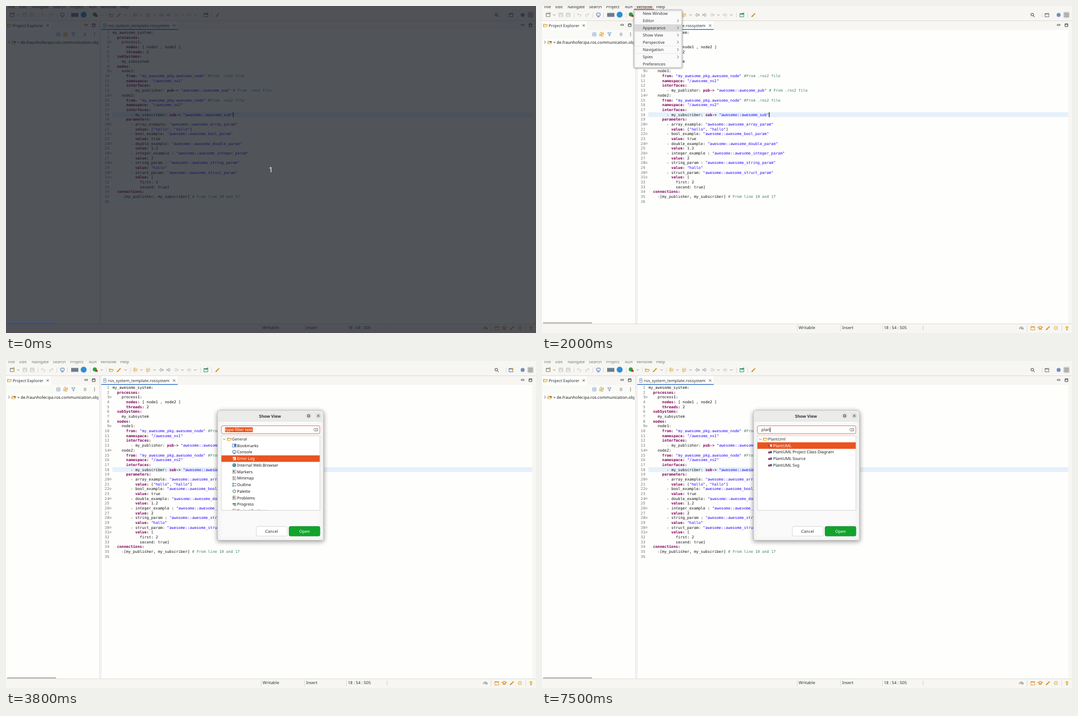
Write an HTML page with a canvas that moves like this. It is 952 px wide and 588 px high and loops after 8 s.

```html
<!DOCTYPE html>
<html lang="en">
<head>
<meta charset="utf-8">
<title>Show View</title>
<style>
html, body { margin: 0; width: 100%; height: 100%; overflow: hidden; background: #fff; }
canvas { display: block; width: 952px; height: 588px; }
</style>
</head>
<body>
<canvas id="stage" width="952" height="588"></canvas>
<script>
const ctx = document.getElementById('stage').getContext('2d');
const LOOP = 8000;
const UI = '"Noto Sans", "Open Sans", sans-serif';
const MONO = '"DejaVu Sans Mono", monospace';
const CODE_SIZE = 6.785, COLUMN = 4.085, CODE_X = 191.3, LINE = 8.68;
const PAPER = '#fefffd', CHROME = '#f7f6f2', ORANGE = '#e95420', INK = '#2e3236',
  GRAY = '#8b8d8e', PALE = '#c3c3c0', BLUE = '#3c74b8', GOLD = '#d9a02c', RULE = '#d3d2ce';

const code = `my_awesome_system:
  processes:
    process1:
      nodes: [ node1 , node2 ]
      threads: 2
  subSystems:
    my_subsystem
  nodes:
    node1:
      from: "my_awesome_pkg.awesome_node" #From .ros2 file
      namespace: "/awesome_ns1"
      interfaces:
        - my_publisher: pub-> "awesome::awesome_pub" # From .ros2 file
    node2:
      from: "my_awesome_pkg.awesome_node" #From .ros2 file
      namespace: "/awesome_ns2"
      interfaces:
        - my_subscriber: sub-> "awesome::awesome_sub"
      parameters:
        - array_example: "awesome::awesome_array_param"
          value: ["hello", "hallo"]
        - bool_example: "awesome::awesome_bool_param"
          value: true
        - double_example: "awesome::awesome_double_param"
          value: 1.2
        - integer_example : "awesome::awesome_integer_param"
          value: 2
        - string_param : "awesome::awesome_string_param"
          value: "hallo"
        - struct_param: "awesome::awesome_struct_param"
          value: [
            first: 2
            second: true]
  connections:
    -[my_publisher, my_subscriber] # From line 10 and 17
`.split('\n');
const folds = [3, 9, 14, 20, 22, 24, 26, 28, 30, 31];
const token = /(#.*)|("[^"]*")|(\b(?:processes|nodes|threads|subSystems|from|namespace|interfaces|parameters|value|connections):|(?:pub|sub)->)|[^\s"#]+/g;

// Drawing helpers
function rect(x, y, w, h, color) {
  ctx.fillStyle = color;
  ctx.fillRect(x, y, w, h);
}
function panel(x, y, w, h, r, fill, border) {
  ctx.beginPath();
  ctx.roundRect(x, y, w, h, r);
  ctx.fillStyle = fill;
  ctx.fill();
  if (!border) return;
  ctx.strokeStyle = border;
  ctx.lineWidth = 0.8;
  ctx.stroke();
}
function disc(x, y, r, color) {
  ctx.beginPath();
  ctx.arc(x, y, r, 0, 7);
  ctx.fillStyle = color;
  ctx.fill();
}
function stroke(x, y, d, color = INK, width = 0.9) {
  ctx.save();
  ctx.translate(x, y);
  ctx.strokeStyle = color;
  ctx.lineWidth = width;
  ctx.stroke(new Path2D(d));
  ctx.restore();
}
function text(s, x, y, { size = 7.4, color = INK, weight = 400, align = 'left', font = UI } = {}) {
  ctx.font = `${weight} ${size}px ${font}`;
  ctx.textAlign = align;
  ctx.fillStyle = color;
  ctx.fillText(s, x, y + size * 0.355);
}
function withShadow(blur, draw) {
  ctx.save();
  ctx.shadowColor = 'rgba(0,0,0,.4)';
  ctx.shadowBlur = blur;
  ctx.shadowOffsetY = blur / 5;
  draw();
  ctx.restore();
}

// Small icons, all centred on x, y
const down = (x, y, c = GRAY) => stroke(x, y, 'M-2.2-1L0 1.2L2.2-1', c);
const right = (x, y, c = '#555') => stroke(x, y, 'M-1.2-2.5L1.3 0L-1.2 2.5', c);
const cross = (x, y, c = '#555') => stroke(x, y, 'M-2-2L2 2M2-2L-2 2', c);
const frame = (x, y, c = INK, w = 7, h = 6) => {
  stroke(x, y, `M${-w / 2} ${-h / 2}h${w}v${h}h${-w}z`, c);
  stroke(x, y, `M${-w / 2} ${1 - h / 2}h${w}`, c);
};
const minMax = (a, b, y) => {
  stroke(a, y, 'M-2.5-1.5h5v2h-5z', INK, 0.7);
  frame(b, y, INK, 5, 5);
};
const arrow = (x, y, c, dir = 1) => stroke(x, y, `M${-3.5 * dir}-1h${4 * dir}v-2l${3 * dir} 3l${-3 * dir} 3v-2h${-4 * dir}z`, c);
const folder = (x, y) => {
  stroke(x, y, 'M-3.5 2.5v-5h2.5l1 1h3v1.5M-3.5 2.5l1.5-3.5h6l-1.7 3.5z', GOLD);
};
const pencil = (x, y, c = GOLD) => {
  stroke(x, y, 'M-3 3L2.8-2.8', c, 2.2);
  stroke(x, y, 'M-3.4 3.4l1.3-1.3', INK, 1);
};
const divider = x => rect(x, 12, 0.7, 9, RULE);

function drawToolbar(t) {
  rect(0, 0, 952, 588, CHROME);
  const color = t >= 3500 ? '#777a7c' : INK;
  [['File', 4], ['Edit', 24], ['Navigate', 46], ['Search', 84], ['Project', 115],
   ['Run', 149], ['Window', 170], ['Help', 205]].forEach(([s, x]) => text(s, x, 1.2, { color }));

  frame(11, 16, '#6b7c7c');
  stroke(14, 13, 'M-2 0h4M0-2v4', GOLD, 1.2);
  for (const x of [22, 172, 215, 243, 267, 317, 340]) down(x, 16);
  for (const x of [34, 47]) {
    panel(x - 3.5, 12.5, 7, 7, 1, '#dededb', PALE);
    rect(x - 1.5, 16.5, 3, 3, '#f2f2ef');
  }
  for (const x of [57, 91, 110, 151, 180, 223, 349, 369, 898]) divider(x);
  stroke(67, 16, 'M-2-3l-1.5 2l2 1.5M-3-1h3q3 0 3 2t-3 2', PALE);
  stroke(81, 16, 'M2-3l1.5 2l-2 1.5M3-1h-3q-3 0-3 2t3 2', PALE);
  panel(98, 12.8, 6.5, 5, 1, '#e4eefb', '#2f5fa8');
  rect(99.5, 19, 3.5, 1, '#2f5fa8');
  rect(117, 12.5, 13, 7, '#6d7d90');
  disc(139.5, 15.5, 5.3, '#2b8ed6');
  disc(159.5, 15.2, 3.6, '#2fa045');
  rect(160.5, 16, 4, 3.5, '#b5382d');
  folder(189, 16.5);
  pencil(203, 16);
  stroke(232, 16, 'M-2-3.5v4h-1.5l2.5 3l2.5-3H0v-4zM3-3v6', GOLD);
  stroke(255, 16, 'M-2 3.5v-4h-1.5l2.5-3l2.5 3H0v4zM3-3v6', GOLD);
  arrow(279, 16, '#8d9ba6', -1);
  arrow(292, 16, '#8d9ba6');
  arrow(306, 16, PALE, -1);
  arrow(329, 16, PALE);
  frame(359, 16.5, '#238b83');
  stroke(361, 14, 'M-2 2L2-2', '#2fa045', 1.5);
  pencil(380, 16);

  stroke(881, 15.5, 'M2 0A2.4 2.4 0 1 1-2.8 0A2.4 2.4 0 1 1 2 0M1.3 1.7L4 4.4', INK, 1);
  frame(907, 16.5, '#54708f');
  stroke(909, 13.5, 'M-2 0h4M0-2v4', GOLD);
  disc(928, 16, 3.6, '#6b8fc0');
  panel(937, 11, 10, 10, 1.5, '#dededb', '#b9b9b5');
  for (let i = 0; i < 9; i++) rect(938.8 + i % 3 * 2.6, 12.7 + (i / 3 | 0) * 2.6, 1.4, 1.4, '#444');
}

function drawExplorer() {
  rect(0, 26, 952, 0.7, RULE);
  rect(0, 27, 168, 544, PAPER);
  rect(0, 27, 168, 16, CHROME);
  rect(0, 27, 80, 16, PAPER);
  rect(0, 43, 168, 16, '#fafaf7');
  folder(6, 35);
  text('Project Explorer', 12, 35);
  cross(75, 35);
  minMax(144, 157.5, 34.5);
  panel(91, 48, 6, 6, 0.5, '#e8f0fa', '#7697bd');
  stroke(94, 51, 'M-1.8 0h3.6', BLUE);
  arrow(107, 49.5, GOLD, -1);
  arrow(107, 52.5, GOLD);
  stroke(121, 51, 'M-3.2-3h6.4l-2.4 3v3l-1.6-1v-2z', '#5789b8');
  stroke(142, 51, 'M-2.5-2h5M-2.5 0h5M-2.5 2h5', GRAY);
  for (const dy of [-2.5, 0, 2.5]) disc(159, 51 + dy, 0.8, '#555');
  right(5.2, 65);
  folder(14, 65.5);
  rect(14, 63, 3, 3, '#8d7a55');
  ctx.save();
  ctx.beginPath();
  ctx.rect(0, 60, 167.5, 12);
  ctx.clip();
  text('> de.fraunhofer.ipa.ros.communication.obj', 20.2, 65.3, { size: 7.3, color: '#1c1c1c' });
  ctx.restore();
  rect(2, 569, 88, 1.5, '#9b9b98');
  rect(168, 27, 0.7, 544, RULE);
  rect(171, 27, 0.7, 544, RULE);
}

function drawEditor(caretOn) {
  rect(171.5, 43, 780, 528, PAPER);
  rect(945.5, 43, 7, 528, CHROME);
  rect(171.5, 27, 136.5, 16, PAPER);
  rect(171, 41.5, 137.5, 1.5, '#3f78c9');
  panel(175, 31.5, 5, 7, 0.5, '#e6edf5', '#8097b4');
  rect(176, 34, 3, 0.8, BLUE);
  text('ros_system_template.rossystem', 183, 35.2);
  cross(302, 35.2);
  minMax(928, 942, 34.5);
  rect(191, 191, 754.5, 8.7, '#e6f0fb');

  code.forEach((line, i) => {
    const y = 47.6 + i * LINE;
    text(i + 1, 185.5, y, { size: CODE_SIZE, color: '#777', align: 'right', font: MONO });
    for (const m of line.matchAll(token)) {
      const color = m[1] ? '#3f7f5f' : m[2] ? '#2a00ff' : m[3] ? '#7f0055' : '#111';
      text(m[0], CODE_X + m.index * COLUMN, y,
        { size: CODE_SIZE, color, weight: m[3] ? 700 : 400, font: MONO });
    }
  });
  for (const n of folds) {
    const y = 47.6 + (n - 1) * LINE;
    stroke(187.5, y, 'M1.7 0A1.7 1.7 0 1 1-1.7 0A1.7 1.7 0 1 1 1.7 0M-1 0h2', '#8a8f96', 0.6);
  }
  if (caretOn) rect(407.6, 191, 1.1, 8.8, '#000');
}

function drawStatus() {
  rect(0, 571, 952, 17, CHROME);
  rect(0, 571, 952, 0.7, RULE);
  for (const x of [458, 536, 611, 871, 933]) rect(x, 573, 0.7, 12, RULE);
  text('Writable', 461, 578.8, { size: 7.5 });
  text('Insert', 539, 578.8);
  text('18 : 54 : 505', 614, 578.8);
  for (const dy of [-3, -1, 1, 3]) rect(684, 578.5 + dy, 0.9, 0.9, GRAY);
  stroke(861, 579, 'M-3.5 2q0-4 3.5-4t3.5 4h-2q0-2-2-2v2', '#6f6a62');
  frame(881.5, 579.5, '#e0902c');
  stroke(895, 579, 'M-4-1l4-2l4 2l-4 2zM-2 0v2.5h4V0', '#e0902c', 1.2);
  pencil(909, 579);
  stroke(923, 579, 'M3 0A3 3 0 1 1-3 0A3 3 0 1 1 3 0M-1 0h2', GOLD);
  disc(943, 578, 2.6, '#efc53a');
  rect(942, 581, 2, 2, GRAY);
}

const menuItems = [['New Window', 13.8], ['Editor', 26.5, 1], ['Appearance', 39.2, 1], ['Show View', 52.3, 1],
  ['Perspective', 65.1, 1], ['Navigation', 78.4, 1], ['Spies', 91.6, 1], ['Preferences', 104.4]];
function drawMenu(t) {
  rect(165, 0, 36, 7, '#e7e6e2');
  text('Window', 170, 1.2);
  rect(165, 5.3, 36, 1.7, ORANGE);
  withShadow(3, () => panel(165.3, 7.2, 86.4, 103.8, 1, '#fafafa', '#c6c6c4'));
  const hover = t < 1800 ? -1 : t < 1900 ? 0 : t < 2000 ? 1 : t < 2200 ? 2 : 3;
  menuItems.forEach(([label, y, more], i) => {
    if (i === hover) rect(166, y - 6.2, 85, 12.6, '#d9d9d8');
    text(label, 181, y, { size: 7.3 });
    if (more) right(244, y);
  });
  for (const y of [45.7, 71.7, 84.9]) rect(166, y, 85, 0.6, '#dcdcda');
  if (t < 2400) return;
  withShadow(3, () => panel(250.5, 45.7, 57.3, 13.6, 2, '#fafafa', '#c6c6c4'));
  if (t >= 2900) rect(251, 46.2, 56.3, 12.6, '#d9d9d8');
  text('Other...', 266, 52.4, { size: 7.3 });
  rect(266.3, 56, 5, 0.6, INK);
}

const generalViews = ['Bookmarks', 'Console', 'Error Log', 'Internal Web Browser', 'Markers', 'Minimap',
  'Outline', 'Palette', 'Problems', 'Progress', 'Project Explorer'];
const plantViews = ['PlantUML', 'PlantUML Project Class Diagram', 'PlantUML Source', 'PlantUML Svg'];
const viewIcons = {
  'Bookmarks': (x, y) => { panel(x - 3.5, y - 3, 7, 6, 0, '#dfe9f3', '#6f8fb5'); rect(x, y - 3, 3, 5, BLUE); },
  'Console': (x, y) => { panel(x - 3, y - 3, 6, 4.5, 1, '#edf4fc', '#2f5fa8'); rect(x - 1.5, y + 2.2, 3, 1, '#2f5fa8'); },
  'Error Log': (x, y) => { rect(x - 2.5, y - 3, 5.5, 6, '#fff'); cross(x - 1.5, y + 1, '#c33'); },
  'Internal Web Browser': (x, y) => { disc(x, y, 3.4, '#4e86b8'); disc(x - 0.8, y - 0.8, 1.6, '#6db070'); },
  'Outline': (x, y) => { stroke(x, y, 'M-3-3h2v2h-2zM-3 1h2v2h-2zM0-2h4M0 2h4', BLUE); },
  'Palette': (x, y) => { for (let a = 0; a < 8; a++) disc(x + 2.4 * Math.cos(a * 0.785), y + 2.4 * Math.sin(a * 0.785), 0.9, a % 2 ? '#6a9a4d' : '#8a8f87'); },
  'Progress': (x, y) => { rect(x - 3, y - 2, 6, 2.4, '#3a9a48'); rect(x - 1, y + 1, 4.5, 2, '#7aa67f'); },
};
function pageIcon(x, y, accent) {
  panel(x - 3, y - 3.2, 6, 6.4, 0, '#f4f1ec', '#a0a0a0');
  rect(x - 2, y - 2, 2.5, 2.5, accent);
  rect(x - 2, y + 1.2, 4, 0.8, GRAY);
}

function drawList(t) {
  const filtered = t >= 7200;
  const views = filtered ? plantViews : generalViews;
  const selected = filtered ? 0 : 2;
  panel(386.7, 134.4, 177.2, 134.2, 0, '#fff', '#c9c9c7');
  ctx.save();
  ctx.beginPath();
  ctx.rect(387, 135, 176.6, 133.2);
  ctx.clip();
  down(392, 140.4, '#666');
  folder(401, 140.5);
  text(filtered ? 'PlantUml' : 'General', 406, 140.4, { size: 7.25 });
  views.forEach((label, i) => {
    const y = 152.1 + i * 11.73;
    if (i === selected) rect(387, y - 5.9, 177, 11.7, ORANGE);
    if (filtered) {
      disc(408, y + 0.7, 2, '#b83a3a');
      rect(409.5, y - 2, 3.5, 4, i ? '#3d5f9f' : '#f3ece8');
    } else if (viewIcons[label]) viewIcons[label](410, y);
    else pageIcon(410, y, label === 'Minimap' ? '#7d93ad' : label === 'Project Explorer' ? GOLD : '#b5403c');
    text(label, 415, y, { size: 7.25, color: i === selected ? '#fff' : '#1c1c1c' });
  });
  if (!filtered) {
    ctx.globalAlpha = t < 4500 ? 0 : t < 4700 ? 0.35 : t < 5000 ? 0.7 : 1;
    rect(561.8, 136, 1.4, 32, '#90908e');
  }
  ctx.restore();
}

function drawDialog(t) {
  const grow = 1 - (1 - Math.min(1, (t - 3450) / 250)) ** 3;
  ctx.save();
  ctx.globalAlpha = grow;
  ctx.translate(0, 205.5 * (1 - grow));
  ctx.scale(1, grow);
  withShadow(9, () => panel(380, 89, 190.3, 233.5, [5, 5, 2, 2], '#fafafa', '#b3b3b1'));
  panel(380.4, 89.4, 189.5, 18.6, [5, 5, 0, 0], '#ebebea');
  rect(380.4, 108, 189.5, 0.6, '#d8d8d6');
  text('Show View', 474.2, 99, { weight: 700, align: 'center' });
  disc(543.6, 98.6, 5, '#dcdcdb');
  stroke(543.6, 98.6, 'M-1.8-1.8h3.6v3.6h-3.6z');
  disc(561, 98.6, 5, '#dcdcdb');
  cross(561, 98.6, INK);

  panel(386.9, 116.4, 176.8, 14.4, 2.5, '#fff', ORANGE);
  if (t < 6300) {
    rect(393.5, 119.2, 49.8, 8.8, ORANGE);
    text('type filter text', 394, 123.6, { color: '#fff' });
  } else {
    const typed = 'plan'.slice(0, t < 6500 ? 1 : t < 6800 ? 2 : t < 7100 ? 3 : 4);
    text(typed, 394, 123.6);
    const end = 394 + ctx.measureText(typed).width;
    if (t < 7200 || t >= 7500) rect(end + 0.2, 119.2, 0.9, 8.8, '#111');
  }
  stroke(556, 123.6, 'M-4 0l2.2-2.3h5.5v4.6h-5.5zM-.3-1l2 2M1.7-1l-2 2', '#555', 0.7);

  drawList(t);
  panel(449.7, 297.4, 55.4, 17.4, 2.5, '#fff', '#cfcfcd');
  text('Cancel', 477, 306.2, { align: 'center' });
  panel(508.5, 297.4, 55.4, 17.4, 2.5, '#12a32c', '#0d8a24');
  text('Open', 536.3, 306.2, { align: 'center', color: '#fff' });
  ctx.restore();
}

function drawCountdown() {
  rect(0, 0, 952, 588, 'rgba(22,26,34,.74)');
  rect(2, 569, 88, 1.5, '#3d5585');
  text('1', 475.7, 294.3, { size: 13, color: '#fff', align: 'center' });
}

function render(t) {
  ctx.textRendering = 'geometricPrecision';
  const caretOn = t < 300 || (t >= 800 && t < 1400) || (t >= 2000 && t < 2700);
  drawToolbar(t);
  drawExplorer();
  drawEditor(caretOn);
  drawStatus();
  if (t >= 500 && t < 3300) drawMenu(t);
  if (t >= 3500) drawDialog(t);
  if (t < 100) drawCountdown();
}

const start = performance.now();
function tick() {
  render((performance.now() - start) % LOOP);
  requestAnimationFrame(tick);
}
tick();
</script>
</body>
</html>
```
